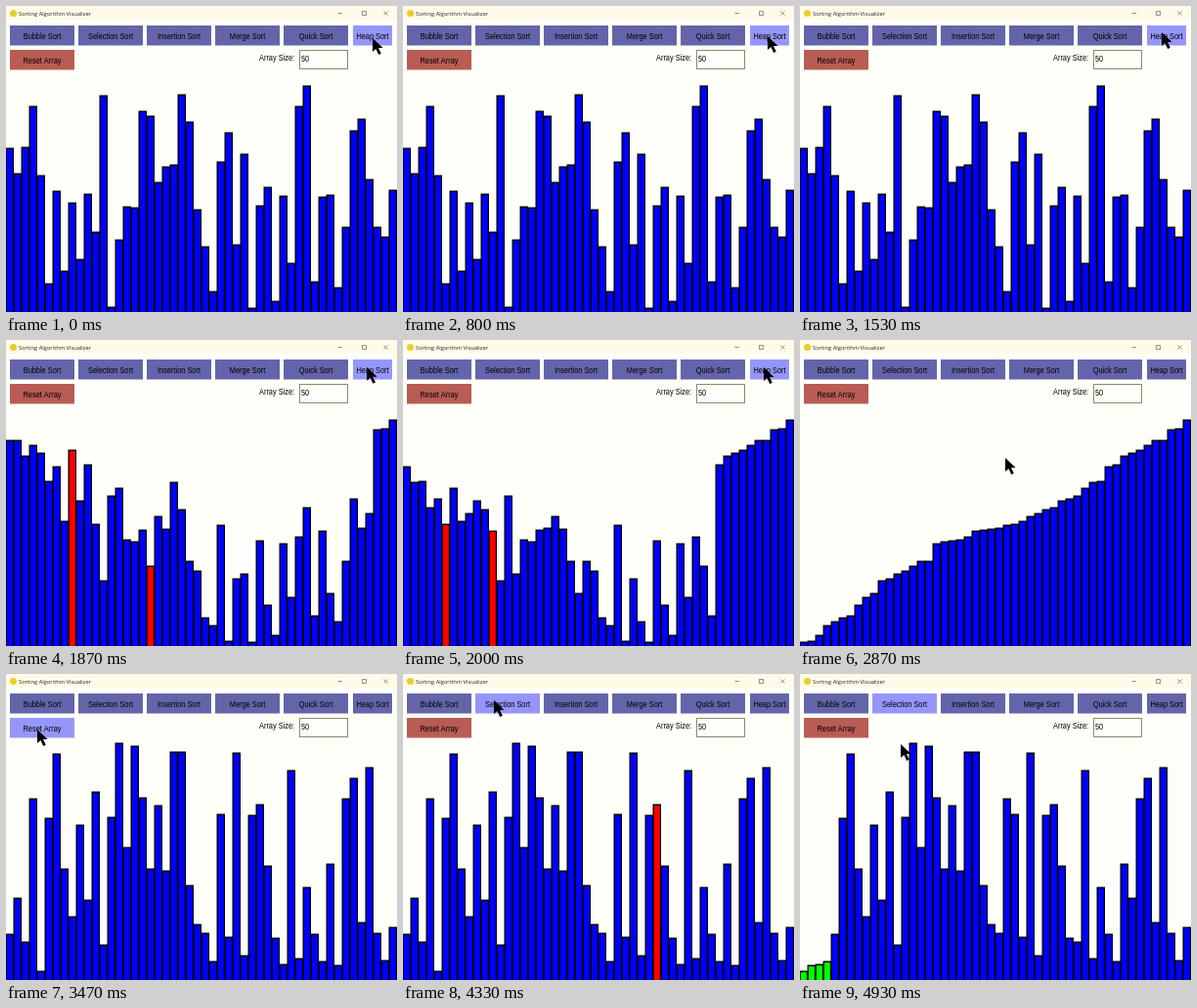
Animation, 400 px wide and 314 px high, one loop 5 s. Source, as an HTML page with a canvas:

```html
<!DOCTYPE html>
<html lang="en">
<head>
<meta charset="utf-8">
<title>Sorting Algorithm Visualizer</title>
<style>
  html, body { margin: 0; height: 100%; overflow: hidden; background: #fffffa; }
  canvas { display: block; }
</style>
</head>
<body>
<canvas id="stage" width="400" height="314"></canvas>
<script>
const ctx = document.getElementById('stage').getContext('2d');
const FLOOR = 314, BAR = 8, LOOP = 5000, FPS = 15;
const STEPS_PER_FRAME = 159 / 9;   // sorting speed
const RESET_FRAME = 51;

const toHeights = tops => tops.map(y => FLOOR - y);
const firstArray = toHeights([
  146, 172, 145, 103, 174, 285, 190, 272, 202, 260, 193, 232, 92, 309, 240, 206, 207,
  108, 113, 181, 165, 163, 91, 119, 209, 247, 293, 160, 130, 245, 152, 310, 205, 186,
  303, 195, 264, 103, 82, 283, 196, 194, 289, 227, 128, 116, 178, 227, 237, 189]);
const secondArray = toHeights([
  267, 230, 275, 128, 305, 148, 82, 200, 249, 155, 232, 121, 278, 147, 71, 178, 74,
  127, 200, 135, 202, 80, 80, 217, 257, 266, 295, 144, 270, 81, 289, 145, 134, 197,
  271, 298, 99, 292, 219, 267, 295, 195, 299, 128, 107, 255, 96, 266, 294, 260]);

const buttons = [
  ['Bubble Sort', 4, 20, 66], ['Selection Sort', 74, 20, 66], ['Insertion Sort', 144, 20, 66],
  ['Merge Sort', 214, 20, 66], ['Quick Sort', 284, 20, 66], ['Heap Sort', 355, 20, 40],
  ['Reset Array', 4, 45, 66]
].map(([label, x, y, w]) => ({ label, x, y, w, h: 20.5 }));
const SELECTION = 1, HEAP = 5, RESET = 6;

// [frame, x, y]
const cursorPath = [
  [0, 375, 33], [12, 373, 31], [23, 370, 27], [30, 369, 28], [38, 369, 28], [43, 210, 121],
  [50, 32, 57], [53, 32, 57], [61, 93, 27], [66, 93, 27], [74, 103, 72]];

function swap(list, a, b) {
  [list[a], list[b]] = [list[b], list[a]];
}

// Every swap of a heap sort, with the array as it stands afterwards
function heapSortSteps(source) {
  const bars = source.slice(), steps = [];
  const record = (a, b, end) => {
    swap(bars, a, b);
    steps.push({ bars: bars.slice(), red: [a, b], end });
  };
  const sift = (i, n) => {
    let top = i;
    for (const child of [2 * i + 1, 2 * i + 2])
      if (child < n && bars[child] > bars[top]) top = child;
    if (top === i) return;
    record(i, top, n);
    sift(top, n);
  };
  const n = bars.length;
  for (let i = n / 2 - 1; i >= 0; i--) sift(i, n);
  for (let end = n - 1; end > 0; end--) {
    record(0, end, end);
    sift(0, end);
  }
  return steps;
}

const heapSteps = heapSortSteps(firstArray);
const sortedArray = firstArray.slice().sort((a, b) => a - b);
const tenSorted = heapSteps.findIndex(s => s.end === 39) - 1;   // reached at frame 30

function selectionState(step) {
  const bars = secondArray.slice(), last = bars.length - 1;
  let i = 0;
  for (; step >= last - i; i++) {
    step -= last - i;
    let min = i;
    for (let j = i + 1; j <= last; j++) if (bars[j] < bars[min]) min = j;
    swap(bars, i, min);
  }
  return { bars, red: step > 0 ? [i + 1 + step] : [], green: i, busy: SELECTION };
}

function stateAt(frame) {
  if (frame >= RESET_FRAME) {
    const step = Math.round(31 + (frame - 65) * STEPS_PER_FRAME);
    return step >= 0 ? selectionState(step) : { bars: secondArray };
  }
  const step = Math.round(tenSorted + (frame - 30) * STEPS_PER_FRAME);
  if (step < 0) return { bars: firstArray };
  if (step >= heapSteps.length) return { bars: sortedArray };
  return { ...heapSteps[step], busy: HEAP };
}

function cursorAt(frame) {
  const next = Math.max(1, cursorPath.findIndex(p => p[0] >= frame));
  const [f0, x0, y0] = cursorPath[next - 1], [f1, x1, y1] = cursorPath[next];
  const u = (frame - f0) / (f1 - f0), e = u * u * (3 - 2 * u);
  return [x0 + (x1 - x0) * e, y0 + (y1 - y0) * e];
}

function rect(color, x, y, w, h) {
  ctx.fillStyle = color;
  ctx.fillRect(x, y, w, h);
}

// Condensed interface lettering
function label(text, x, y, align = 'left') {
  ctx.save();
  ctx.translate(x, y);
  ctx.scale(0.82, 1);
  ctx.font = '9px "Liberation Sans", Arial, sans-serif';
  ctx.textAlign = align;
  ctx.fillStyle = '#000';
  ctx.fillText(text, 0, 0);
  ctx.restore();
}

function drawTitleBar() {
  rect('#fffbe8', 0, 0, 400, 14);
  ctx.fillStyle = '#e6d02c';
  ctx.beginPath();
  ctx.arc(7.5, 7.5, 3.5, 0, 7);
  ctx.fill();
  ctx.font = '5.75px "Open Sans", sans-serif';
  ctx.fillStyle = '#222';
  ctx.fillText('Sorting Algorithm Visualizer', 13, 9.5);
  ctx.strokeStyle = '#666';
  ctx.lineWidth = 0.7;
  ctx.beginPath();
  ctx.moveTo(339.5, 7.5); ctx.lineTo(344, 7.5);
  ctx.rect(364.5, 5.5, 4, 4);
  ctx.moveTo(386.5, 5.5); ctx.lineTo(390.5, 9.5);
  ctx.moveTo(390.5, 5.5); ctx.lineTo(386.5, 9.5);
  ctx.stroke();
}

function drawControls(hover) {
  buttons.forEach(({ label: text, x, y, w, h }, i) => {
    rect(i === hover ? '#9696fa' : i === RESET ? '#b85c54' : '#6464aa', x, y, w, h);
    label(text, x + w / 2, y + 14, 'center');
  });
  label('Array Size:', 259, 56);
  rect('#8a8a68', 300, 45, 50, 20);
  rect('#fffffa', 301, 46, 48, 18);
  label('50', 302, 57);
}

function drawBars({ bars, red = [], green = 0 }) {
  bars.forEach((h, i) => {
    const x = i * BAR, y = FLOOR - h;
    rect('#000', x - 0.5, y - 0.5, BAR + 0.5, h + 0.5);
    rect(red.includes(i) ? '#f00' : i < green ? '#0f0' : '#00f', x + 0.8, y + 1, BAR - 2, h);
  });
}

function drawCursor(x, y) {
  ctx.beginPath();
  for (const [dx, dy] of [[0, 0], [0, 14], [3.4, 11], [6.2, 17], [8.8, 15.8], [6, 10], [10.5, 10]])
    ctx.lineTo(x + dx, y + dy);
  ctx.closePath();
  ctx.fillStyle = '#000';
  ctx.fill();
}

function draw() {
  const frame = Math.floor((performance.now() % LOOP) * FPS / 1000 + 0.06) % 75;
  const state = stateAt(frame), [cx, cy] = cursorAt(frame);
  const under = buttons.findIndex(b => cx >= b.x && cx < b.x + b.w && cy >= b.y && cy < b.y + b.h);
  rect('#fffffa', 0, 0, 400, FLOOR);
  drawTitleBar();
  drawControls(state.busy ?? under);
  drawBars(state);
  drawCursor(cx, cy);
  requestAnimationFrame(draw);
}
draw();
</script>
</body>
</html>
```
